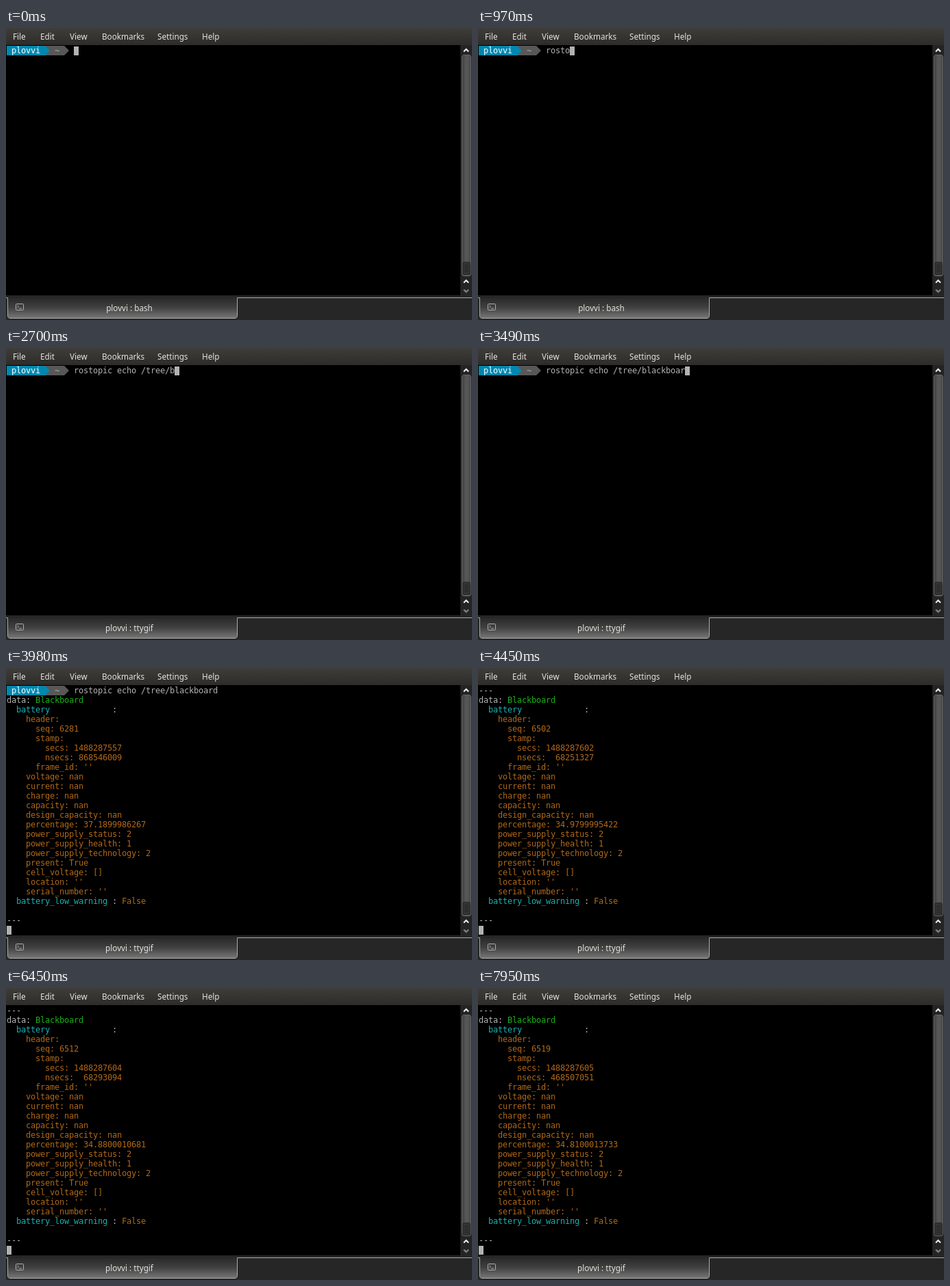
An HTML page for the animation above (8000 ms loop, 680 by 427 pixels).

```html
<!DOCTYPE html>
<html lang="en">
<head>
<meta charset="utf-8">
<title>Terminal</title>
<style>
  html, body { margin: 0; width: 100%; height: 100%; overflow: hidden; background: #000; }
  svg { position: absolute; left: 0; top: 0; display: block; }
  .ui { font: 11.7px "Noto Sans", "Open Sans", sans-serif; fill: #e6e3dc; white-space: pre; }
  #screen {
    position: absolute; left: 1px; top: 26px; margin: 0;
    font: 12px/14px "DejaVu Sans Mono", monospace;
    letter-spacing: calc(7px - 1ch); /* snap glyphs to 7px cells */
    font-variant-ligatures: none;
    color: #b2b2b2;
  }
  .white { color: #fff; }
  .green { color: #18b218; }
  .cyan { color: #18b2b2; }
  .orange { color: #b26818; }
</style>
</head>
<body>
<svg width="680" height="427" viewBox="0 0 680 427">
  <defs>
    <linearGradient id="menuFill" x2="0" y2="1">
      <stop stop-color="#3e3d39"/><stop offset="1" stop-color="#2d2c2a"/>
    </linearGradient>
    <linearGradient id="tabFill" x2="0" y2="1">
      <stop stop-color="#282828"/><stop offset=".5" stop-color="#414141"/><stop offset="1" stop-color="#767676"/>
    </linearGradient>
    <linearGradient id="grooveFill">
      <stop stop-color="#404040"/><stop offset=".5" stop-color="#5a5a5a"/><stop offset="1" stop-color="#484848"/>
    </linearGradient>
  </defs>

  <rect width="680" height="427"/>
  <rect width="680" height="25" fill="url(#menuFill)"/>
  <g id="menu" class="ui"></g>

  <g id="prompt">
    <path d="M57 26H85L92 33L85 40H57Z" fill="#585858"/>
    <path d="M1 26H57L64 33L57 40H1Z" fill="#0087af"/>
  </g>
  <rect id="cursor" width="7" height="13" fill="#b2b2b2"/>

  <rect x="663" y="25" width="17" height="367" fill="#242424"/>
  <rect x="665.5" y="39.5" width="13" height="323" rx="3" fill="url(#grooveFill)" stroke="#686868"/>
  <g id="thumb">
    <rect x="666.5" y="342.5" width="11" height="18" rx="2.5" fill="#343434" stroke="#252525"/>
    <path d="M669 347H675M669 350H675M669 353H675M669 356H675" stroke="#232323"/>
  </g>
  <g fill="none" stroke-width="2">
    <path d="M668 34.5L671.5 31L675 34.5M668 372.5L671.5 369L675 372.5" stroke="#eee"/>
    <path d="M668 382.5L671.5 386L675 382.5" stroke="#858585"/>
  </g>

  <rect y="391" width="680" height="36" fill="#262626"/>
  <path d="M0 394.5H2.5V421Q2.5 424.5 6 424.5H334Q337.5 424.5 337.5 421V394.5H680" fill="none" stroke="#aaa"/>
  <path d="M3 394H337V421Q337 424 334 424H6Q3 424 3 421Z" fill="url(#tabFill)"/>
  <g fill="none" stroke="#b0b0b0">
    <rect x="14.5" y="403.5" width="11" height="9" rx="1"/>
    <path d="M16.5 405.5L18.5 407.5L16.5 409.5M19.5 410H23"/>
  </g>
  <text id="title" class="ui" x="180" y="413.5" text-anchor="middle"></text>
</svg>
<pre id="screen"></pre>

<script>
const LOOP = 8000;
const USER = 'plovvi';
const COMMAND = 'rostopic echo /tree/blackboard';
const KEY_TIMES = [
  640, 710, 780, 840, 910, 980, 1040, 1110, 1270,
  1420, 1480, 1530, 1590, 1680,
  1860, 2130, 2290, 2350, 2490, 2560,
  2700, 2780, 2870, 2960, 3060, 3230, 3320, 3400, 3490, 3630
];
const TITLE_TIME = 1270, ENTER_TIME = 3750, SCROLL_TIME = 4450;

// time, message number, sub-millisecond part of its stamp
const MESSAGES = [
  [3980, 6281, 546009], [4450, 6502, 251327], [4950, 6504, 483162], [5450, 6507, 269968],
  [5950, 6509, 491205], [6450, 6512, 293094], [6950, 6514, 502418], [7450, 6517, 310746],
  [7950, 6519, 507051]
];

const byId = id => document.getElementById(id);
const [menu, prompt, cursor, thumb, title, screen] =
  ['menu', 'prompt', 'cursor', 'thumb', 'title', 'screen'].map(byId);
const span = (color, text) => `<span class="${color}">${text}</span>`;

menu.innerHTML = [['File', 10], ['Edit', 50], ['View', 93], ['Bookmarks', 140], ['Settings', 221], ['Help', 286]]
  .map(([label, x]) => `<text x="${x}" y="17">${label}</text>`).join('');

function report([, seq, fine]) {
  const ms = 3068 + 200 * (seq - 6507);
  const whole = Math.floor(ms / 1000);
  const nsecs = (ms - whole * 1000) * 1e6 + fine;
  const percentage = Math.fround((10000 - seq) / 100).toFixed(10);
  const fields = `    header:
      seq: ${seq}
      stamp:
        secs: ${1488287600 + whole}
        nsecs: ${String(nsecs).padStart(9)}
      frame_id: ''
    voltage: nan
    current: nan
    charge: nan
    capacity: nan
    design_capacity: nan
    percentage: ${percentage}
    power_supply_status: 2
    power_supply_health: 1
    power_supply_technology: 2
    present: True
    cell_voltage: []
    location: ''
    serial_number: ''`;
  return [
    'data: ' + span('green', 'Blackboard'),
    '  ' + span('cyan', 'battery'.padEnd(20)) + ':',
    span('orange', fields),
    '  ' + span('cyan', 'battery_low_warning') + ' : ' + span('orange', 'False'),
    '',
    '---'
  ].join('\n');
}

let shown = '';

function draw(t) {
  const typed = KEY_TIMES.filter(k => k <= t).length;
  const message = MESSAGES.filter(m => m[0] <= t).pop();
  const scrolled = t >= SCROLL_TIME;
  const entered = t >= ENTER_TIME;

  const head = scrolled ? '---'
    : ` ${span('white', USER)}   ~   ${COMMAND.slice(0, typed)}`;
  const html = message ? head + '\n' + report(message) : head;
  if (html !== shown) screen.innerHTML = shown = html;

  const row = message ? 25 : entered ? 1 : 0;
  const col = entered ? 0 : 14 + typed;
  cursor.setAttribute('x', 1 + 7 * col);
  cursor.setAttribute('y', 27 + 14 * row);
  prompt.setAttribute('visibility', scrolled ? 'hidden' : 'visible');
  thumb.setAttribute('transform', `translate(0 ${scrolled ? 1 : 0})`);
  title.textContent = `${USER} : ${t < TITLE_TIME ? 'bash' : 'ttygif'}`;
}

const start = performance.now();
function tick() {
  draw((performance.now() - start) % LOOP);
  requestAnimationFrame(tick);
}
tick();
</script>
</body>
</html>
```
